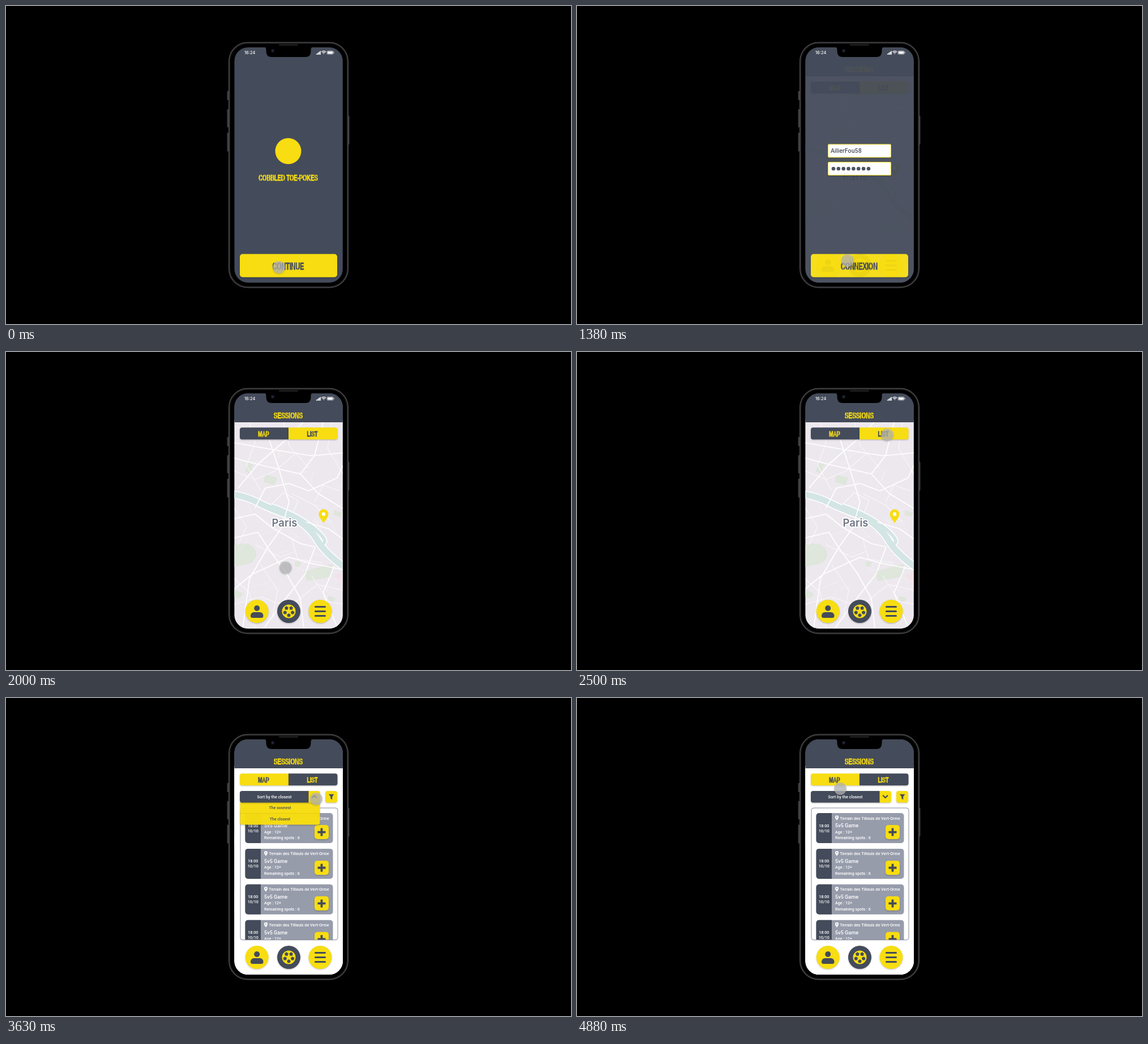
Recreate the animation shown at these times as an HTML page with a canvas. Size 998 px wide and 561 px high, loop 5.01 s.

```html
<!DOCTYPE html>
<html lang="en">
<head>
<meta charset="utf-8">
<title>Session finder</title>
<style>
html, body { margin: 0; width: 100%; height: 100%; overflow: hidden; background: #000; }
canvas { display: block; width: 998px; height: 561px; }
</style>
</head>
<body>
<canvas id="stage" width="998" height="561"></canvas>
<script>
const W = 998, H = 561, LOOP = 5010;
const SLATE = '#444b5a', YELLOW = '#f7dd11', CARD = '#979cab';
const BODY = 'Roboto, "Open Sans", sans-serif';
const stage = document.getElementById('stage').getContext('2d');
let c = stage;

function box(x, y, w, h, r, fill) {
  c.beginPath();
  c.roundRect(x, y, w, h, r);
  if (fill) { c.fillStyle = fill; c.fill(); }
}

function disc(x, y, r, fill) {
  c.beginPath();
  c.arc(x, y, r, 0, Math.PI * 2);
  c.fillStyle = fill;
  c.fill();
}

function shape(d, fill) {
  c.fillStyle = fill;
  c.fill(new Path2D(d));
}

function line(d, color, width) {
  c.strokeStyle = color;
  c.lineWidth = width;
  c.stroke(new Path2D(d));
}

function shadowed(paint) {
  c.save();
  c.shadowColor = 'rgba(0,0,0,.22)';
  c.shadowBlur = 2.5;
  c.shadowOffsetY = 1.2;
  paint();
  c.restore();
}

// y is the middle of the capitals
function text(str, x, y, size, color, align = 'left', weight = 500, family = BODY) {
  c.font = `${weight} ${size}px ${family}`;
  c.textAlign = align;
  c.textBaseline = 'alphabetic';
  c.fillStyle = color;
  c.fillText(str, x, y + size * 0.36);
}

// Heavy condensed capitals with stencil bridges
function stencil(str, x, y, size, color, back) {
  c.save();
  c.translate(x, y);
  c.scale(0.645, 1);
  text(str, 0, 0, size, color, 'center', 700, '"Liberation Sans", Arial, sans-serif');
  c.strokeStyle = color;
  c.lineWidth = 0.8;
  c.lineJoin = 'miter';
  c.miterLimit = 2;
  c.strokeText(str, 0, size * 0.36);
  let pen = -c.measureText(str).width / 2;
  c.fillStyle = back;
  for (const ch of str) {
    const w = c.measureText(ch).width;
    if ('COUAPSDBRN'.includes(ch)) c.fillRect(pen + w * 0.5 - 0.6, -size * 0.42, 1.2, size * 0.84);
    pen += w;
  }
  c.restore();
}

function pin(x, y, s, color, hole) {
  c.save();
  c.translate(x, y);
  c.scale(s, s);
  shape('M0 13C-3 8-8.5 2-8.5-3A8.5 8.5 0 0 1 8.5-3C8.5 2 3 8 0 13Z', color);
  disc(0, -3, 3.2, hole);
  c.restore();
}

function statusBar() {
  text('16:24', 421, 82, 7.4, '#fff', 'left', 500, 'Inter, sans-serif');
  c.fillStyle = '#fff';
  for (let i = 0; i < 4; i++) c.fillRect(548 + i * 2.1, 84 - i * 1.5, 1.6, 1.8 + i * 1.5);
  c.strokeStyle = '#fff';
  c.lineWidth = 1.2;
  for (const r of [1, 3.3, 5.6]) {
    c.beginPath();
    c.arc(561.2, 85, r, -Math.PI * 0.75, -Math.PI * 0.25);
    c.stroke();
  }
  c.lineWidth = 0.6;
  box(567, 79.3, 11.2, 5.8, 1.6);
  c.stroke();
  box(568, 80.2, 9.2, 4, 1, '#fff');
  c.fillRect(578.8, 81.2, 0.8, 2);
}

function bigButton(label) {
  shadowed(() => box(413, 437.5, 172, 41, 5, YELLOW));
  stencil(label, 498.5, 459, 16.6, SLATE, YELLOW);
}

function plainBack() {
  c.fillStyle = SLATE;
  c.fillRect(400, 70, 200, 422);
  statusBar();
}

function splash() {
  plainBack();
  disc(498.5, 256, 23, YELLOW);
  stencil('COBBLED TOE-POKES', 498.5, 303, 14.6, YELLOW, SLATE);
  bigButton('CONTINUE');
}

function login() {
  plainBack();
  for (const y of [244, 275.5]) {
    shadowed(() => box(443.5, y, 111, 23, 1.5, '#fff'));
    c.strokeStyle = YELLOW;
    c.lineWidth = 1;
    c.stroke();
  }
  text('AilierFou58', 448, 255.3, 10.7, SLATE);
  for (let i = 0; i < 8; i++) disc(453 + i * 8.85, 287, 3.3, SLATE);
  bigButton('CONNEXION');
}

function header(mapActive) {
  c.fillStyle = SLATE;
  c.fillRect(400, 70, 200, 54);
  stencil('SESSIONS', 498.5, 111, 15.5, YELLOW, SLATE);
  const [a, b] = mapActive ? [SLATE, YELLOW] : [YELLOW, SLATE];
  shadowed(() => {
    box(413, 133.3, 86, 21, [4, 0, 0, 4], a);
    box(499, 133.3, 86.5, 21, [0, 4, 4, 0], b);
  });
  stencil('MAP', 455, 144.3, 13.5, b, a);
  stencil('LIST', 541, 144.3, 13.5, a, b);
}

function nav() {
  shadowed(() => {
    disc(443.2, 457.5, 20.5, YELLOW);
    disc(499.5, 457.5, 20.5, SLATE);
    disc(555, 457.5, 20.5, YELLOW);
  });
  disc(443.2, 452, 5, SLATE);
  box(432, 459, 22.5, 10, [6, 6, 3.5, 3.5], SLATE);
  for (const y of [449.5, 457.5, 465.5]) box(545, y - 1.6, 20, 3.2, 1.5, SLATE);
  disc(499.5, 457.5, 12, YELLOW);
  for (let k = 0; k < 5; k++) {
    const turn = Math.PI * (0.5 + k * 0.4);
    const x = 499.5 + 7 * Math.cos(turn), y = 457.5 + 7 * Math.sin(turn);
    c.beginPath();
    for (let i = 0; i < 5; i++) {
      const a = turn + Math.PI + i * Math.PI * 0.4;
      c.lineTo(x + 3.5 * Math.cos(a), y + 3.5 * Math.sin(a));
    }
    c.fillStyle = SLATE;
    c.fill();
  }
}

const RIVER = 'M400 251Q425 255 446 266T505 290Q536 308 550 332T600 381';
const BRANCH = 'M468 271Q515 287 543 310T560 338';
const AVENUES = [
  'M403 187L448 199L520 215L552 250L595 276',
  'M410 240L445 198L500 150L525 124',
  'M465 155L480 200L500 265L487 310L462 345',
  'M403 160L470 172L540 183L595 178',
  'M520 215L545 183L560 124',
  'M535 245L585 222L595 200',
  'M440 275L458 240L500 232L535 245',
  'M403 294L440 286L470 310L520 338L546 344',
  'M403 328L445 318L462 345L430 400L418 488',
  'M403 418L435 392L500 362L535 372L595 384',
  'M462 345L495 390L520 435L526 488',
  'M546 344L528 392L490 440L455 488',
  'M530 300L570 312L595 330',
  'M580 378L560 425L586 488'
];
const STREETS = [
  'M430 124L440 160L425 200L450 245', 'M403 210L440 225L475 210L510 180',
  'M490 124L500 165L535 205', 'M575 124L568 170L595 215',
  'M545 265L560 235L590 245', 'M505 250L545 270L575 300',
  'M470 268L490 248L516 262L508 282', 'M403 275L425 308L410 340',
  'M440 340L485 362L510 352', 'M450 375L480 420L470 470',
  'M403 445L450 432L500 450L550 410L595 420', 'M505 330L515 365L560 372',
  'M403 400L430 425L440 488', 'M540 395L570 440L595 445'
];

function parisMap() {
  c.fillStyle = '#ede8ee';
  c.fillRect(400, 120, 200, 372);
  const green = '#dfe6dc';
  shape('M458 216L479 222L474 235L455 229Z', green);
  shape('M426 195L437 198L431 215L422 211Z', green);
  shape('M402 341Q420 334 432 341T442 360Q437 373 424 375L402 379Z', green);
  shape('M527 386L577 374L573 397L531 404Z', green);
  shape('M511 369L521 371L518 379L510 377Z', green);
  shape('M579 279L596 284L595 291L579 288Z', green);
  shape('M403 419L419 426L413 435L403 431Z', green);
  shape('M570 430L582 434L578 442L567 438Z', green);
  shape('M580 394L596 388L596 418Z', '#f2e3e9');

  // Faint side streets
  c.lineJoin = 'round';
  let seed = 11;
  const rnd = () => (seed = seed * 16807 % 2147483647) / 2147483647;
  for (let i = 0; i < 60; i++) {
    const x = 403 + rnd() * 192, y = 124 + rnd() * 364, a = rnd() * 6.28, n = 15 + rnd() * 25;
    line(`M${x} ${y}l${n * Math.cos(a)} ${n * Math.sin(a)}`, 'rgba(255,255,255,.4)', 0.7);
  }
  line(BRANCH, '#fff', 9);
  line(RIVER, '#fff', 14);
  line(BRANCH, '#d3e5e4', 6);
  line(RIVER, '#d3e5e4', 11);
  for (const d of STREETS) line(d, '#f9f7fa', 1.1);
  for (const d of AVENUES) line(d, '#fff', 1.7);

  c.font = '600 18.5px Inter, sans-serif';
  c.textAlign = 'center';
  c.textBaseline = 'alphabetic';
  c.strokeStyle = '#fff';
  c.lineWidth = 3.5;
  c.strokeText('Paris', 492, 308);
  c.fillStyle = '#707683';
  c.fillText('Paris', 492, 308);
  pin(561, 289, 1, YELLOW, '#fff');
}

function mapScreen() {
  parisMap();
  header(true);
  statusBar();
  nav();
}

function gameCard(y) {
  box(422.5, y, 155, 53, 5, CARD);
  box(422.5, y, 27.5, 53, [5, 0, 0, 5], SLATE);
  text('18:00', 436.3, y + 22, 7.2, '#fff', 'center');
  text('10/10', 436.3, y + 31, 7.2, '#fff', 'center');
  pin(459, y + 8.3, 0.36, '#fff', CARD);
  text('Terrain des Tilleuls de Vert-Orme', 464.5, y + 9, 7.2, '#fff');
  text('5v5 Game', 456, y + 21.7, 9.1, '#fff');
  text('Age : 12+', 456, y + 33, 7.1, '#fff');
  text('Remaining spots : 6', 456, y + 43.8, 7.1, '#fff');
  shadowed(() => box(545, y + 21, 25, 25, 5, YELLOW));
  box(550.5, y + 31.7, 14, 3.8, 0.5, SLATE);
  box(555.6, y + 26.6, 3.8, 14, 0.5, SLATE);
}

function chevron(up) {
  c.lineCap = c.lineJoin = 'round';
  const s = up ? -1 : 1;
  line(`M540.8 ${174 - 1.8 * s}L544.6 ${174 + 2 * s}L548.4 ${174 - 1.8 * s}`, SLATE, 2.2);
  c.lineCap = 'butt';
}

function list(open) {
  c.fillStyle = '#fff';
  c.fillRect(400, 120, 200, 372);
  header(false);
  c.save();
  box(414, 194, 172, 233, 4);
  c.clip();
  for (let i = 0; i < 4; i++) gameCard(203 + i * 62.9);
  c.restore();
  box(414, 194, 172, 232.8, 4);
  c.strokeStyle = '#858a9b';
  c.lineWidth = 1;
  c.stroke();

  if (open) {
    shadowed(() => box(413.5, 184, 141, 39.5, [0, 0, 4, 4], YELLOW));
    line('M413.5 203.5H554.5', 'rgba(120,105,0,.18)', 0.7);
    text('The soonest', 484, 193.5, 7, SLATE, 'center');
    text('The closest', 484, 213, 7, SLATE, 'center');
  }
  shadowed(() => {
    box(413, 164, 122, 20.5, [4, 0, 0, 4], SLATE);
    box(534.5, 164, 20.5, 20.5, [0, 4, 4, 0], YELLOW);
    box(564, 164, 21, 20.5, 4, YELLOW);
  });
  text('Sort by the closest', 474, 174, 7.3, '#fff', 'center');
  chevron(open);
  shape('M570 169.8H579.4L576.2 174.3V179.2L573.3 177.4V174.3Z', SLATE);
  nav();
}

function phone() {
  c.fillStyle = '#000';
  c.fillRect(0, 0, W, H);
  for (const [y, h] of [[150, 16], [182, 32], [223.5, 33]]) box(390.5, y, 3.5, h, 1, '#3d3d40');
  box(603.5, 193.5, 3, 51, 1, '#3d3d40');
  box(394, 64.5, 210, 432, 33, '#000');
  c.strokeStyle = '#464649';
  c.lineWidth = 2;
  c.stroke();
  box(396, 66.5, 206, 428, 31);
  c.strokeStyle = '#161618';
  c.lineWidth = 1.2;
  c.stroke();
  box(482, 67.5, 34, 2.2, 1, '#232326');
}

function notch() {
  shape('M455 72Q459.5 72.5 459.5 77V80Q459.5 90 469.5 90H528.5Q538.5 90 538.5 80V77Q538.5 72.5 543 72Z', '#000');
  disc(471, 79, 3.2, '#12141d');
  disc(471, 79, 1.4, '#2b3149');
}

function layer(paint, clipped) {
  const cv = document.createElement('canvas');
  cv.width = W;
  cv.height = H;
  c = cv.getContext('2d');
  if (clipped) {
    box(403.5, 73, 191.3, 415, 24);
    c.clip();
  }
  paint();
  c = stage;
  return cv;
}

const frame = layer(phone);
const listLayer = layer(() => list(false), true);
const first = layer(splash, true);
// Each screen dissolves in between its two times
const cuts = [
  [60, 360, layer(login, true)],
  [1360, 1650, layer(mapScreen, true)],
  [2510, 2740, listLayer],
  [3400, 3630, layer(() => list(true), true)],
  [4250, 4480, listLayer]
];
// time, x, y
const touch = [
  [0, 482, 461], [630, 482, 461], [1250, 478, 449], [1800, 478, 449],
  [2450, 548, 146], [3100, 548, 146], [3400, 548, 178], [3750, 548, 178],
  [4080, 505, 211], [4400, 505, 211], [4875, 465, 160], [LOOP, 465, 160]
];

const clamp = v => Math.min(1, Math.max(0, v));
const ease = p => p * p * (3 - 2 * p);

function touchDot(t) {
  const i = Math.max(1, touch.findIndex(k => k[0] >= t));
  const [t0, x0, y0] = touch[i - 1], [t1, x1, y1] = touch[i];
  const p = ease(clamp((t - t0) / (t1 - t0)));
  shadowed(() => disc(x0 + (x1 - x0) * p, y0 + (y1 - y0) * p, 11, 'rgba(184,184,186,.72)'));
}

function draw(t) {
  c.drawImage(frame, 0, 0);
  c.drawImage(first, 0, 0);
  for (const [from, to, screen] of cuts) {
    c.globalAlpha = clamp((t - from) / (to - from));
    if (c.globalAlpha > 0) c.drawImage(screen, 0, 0);
  }
  c.globalAlpha = 1;
  notch();
  touchDot(t);
}

// Eight pictures a second, each start rounded to 10 ms
function stepTime(t) {
  let k = Math.min(39, Math.floor(t / 125));
  if (Math.round(k * 12.5) * 10 > t) k--;
  return k * 125;
}

const start = performance.now();
function tick() {
  draw(stepTime(Math.max(0, performance.now() - start) % LOOP));
  requestAnimationFrame(tick);
}
tick();
</script>
</body>
</html>
```
